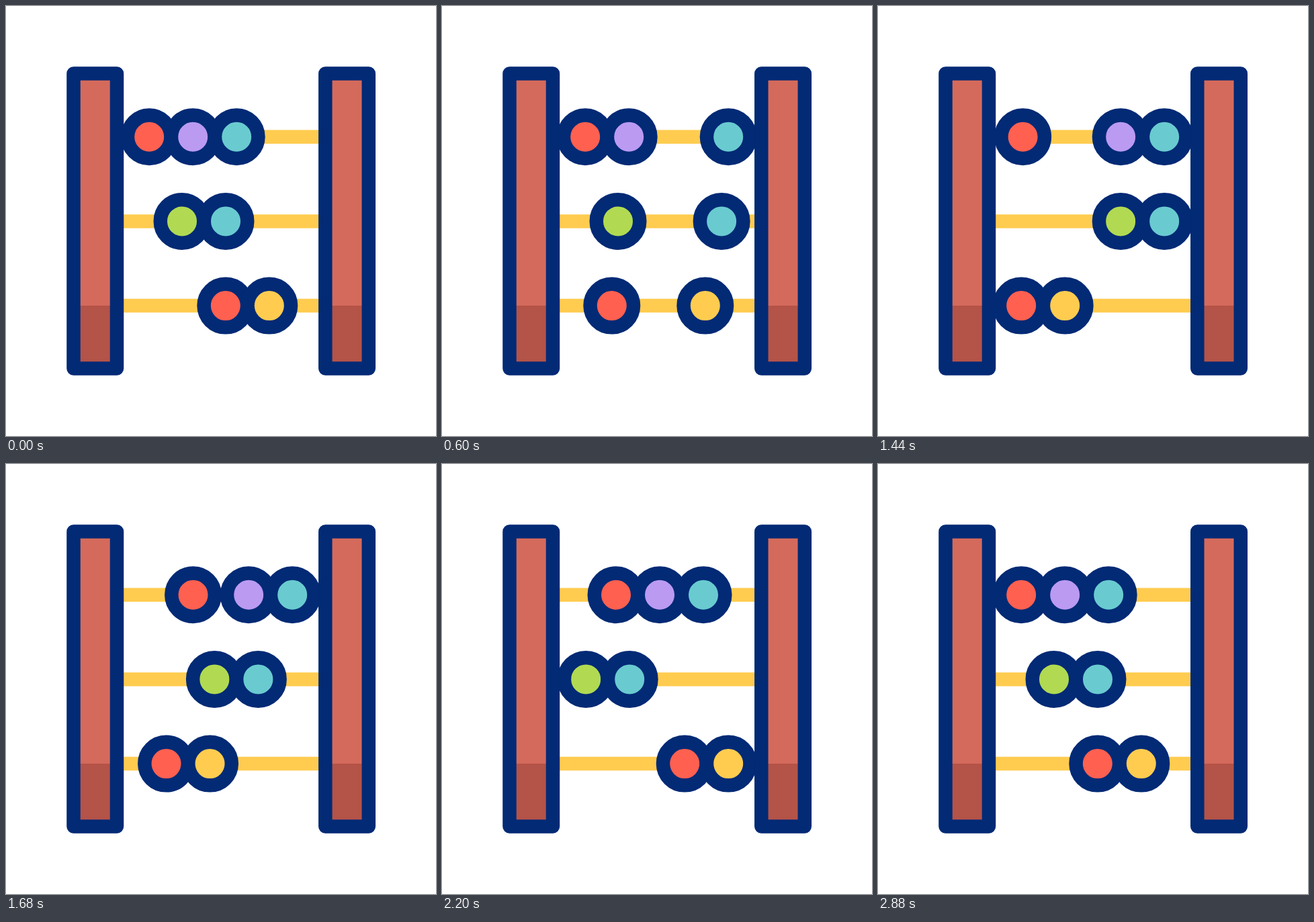
Recreate the animation shown at these times as an HTML page. Size 640 by 640 pixels, loop 3000 ms.

```html
<!DOCTYPE html>
<html lang="en">
<head>
<meta charset="utf-8">
<title>Abacus</title>
<style>
  html, body { margin: 0; width: 100%; height: 100%; overflow: hidden; background: #fff; }
  svg { display: block; width: 100vw; height: 100vh; }
  .rod { stroke: #ffcc50; stroke-width: 20.5; }
  .outline { fill: none; stroke: #022a75; stroke-width: 20.5; stroke-linejoin: round; }
</style>
</head>
<body>
<svg viewBox="0 0 640 640">
  <defs>
    <g id="post">
      <path fill="#d46a5c" d="M100.5 100.5h64.5v346h-64.5z"/>
      <path fill="#b45348" d="M100.5 446h64.5v93.6h-64.5z"/>
      <path class="outline" d="M100.5 100.5h64.5v439.1h-64.5z"/>
    </g>
  </defs>
  <g id="rows"></g>
  <use href="#post"/>
  <use href="#post" x="374.8"/>
</svg>
<script>
const LOOP = 3000;
const LEFT = 213.2, RIGHT = 426.2, GAP = 65;  // outermost bead centres and bead spacing
const RED = '#ff6050', PURPLE = '#bb9af2', TEAL = '#69cbd0', GREEN = '#b1da52', YELLOW = '#ffcc50';

// home: resting x of the first bead; toRight: the side the beads go to one by one.
const rows = [
  { home: LEFT, toRight: true, colors: [RED, PURPLE, TEAL] },
  { home: 262, toRight: true, colors: [GREEN, TEAL] },
  { home: 326.8, toRight: false, colors: [RED, YELLOW] },
];

function add(parent, tag, attributes) {
  const node = document.createElementNS('http://www.w3.org/2000/svg', tag);
  for (const name in attributes) node.setAttribute(name, attributes[name]);
  parent.append(node);
  return node;
}

const layer = document.getElementById('rows');
rows.forEach((row, r) => {
  const y = 194.7 + 125.7 * r;
  add(layer, 'path', { class: 'rod', d: `M165 ${y}H475` });
  row.beads = row.colors.map(color =>
    add(layer, 'circle', { class: 'outline', r: 32.25, cy: y, style: `fill: ${color}` }));
});

function ease(t, start, duration) {
  const s = Math.min(1, Math.max(0, (t - start) / duration));
  return s * s * (3 - 2 * s);
}

const mix = (from, to, amount) => from + (to - from) * amount;

// Beads slide to one side in turn, sweep together to the other side, then return home.
function beadX({ home, toRight, colors }, r, i, t) {
  const count = colors.length;
  const packedRight = RIGHT - GAP * (count - 1);
  const [near, far] = toRight ? [packedRight, LEFT] : [LEFT, packedRight];
  const turn = toRight ? count - 1 - i : i;
  const begin = 200 + 80 * r;

  let x = mix(home, near, ease(t, begin + 600 * turn, 400));
  x = mix(x, far, ease(t, begin + 600 * count, 560 - 50 * r));
  x = mix(x, home, ease(t, 2020 + 130 * r, 600));
  return x + GAP * i;
}

function draw() {
  const t = performance.now() % LOOP;
  rows.forEach((row, r) =>
    row.beads.forEach((bead, i) => bead.setAttribute('cx', beadX(row, r, i, t))));
  requestAnimationFrame(draw);
}
draw();
</script>
</body>
</html>
```
